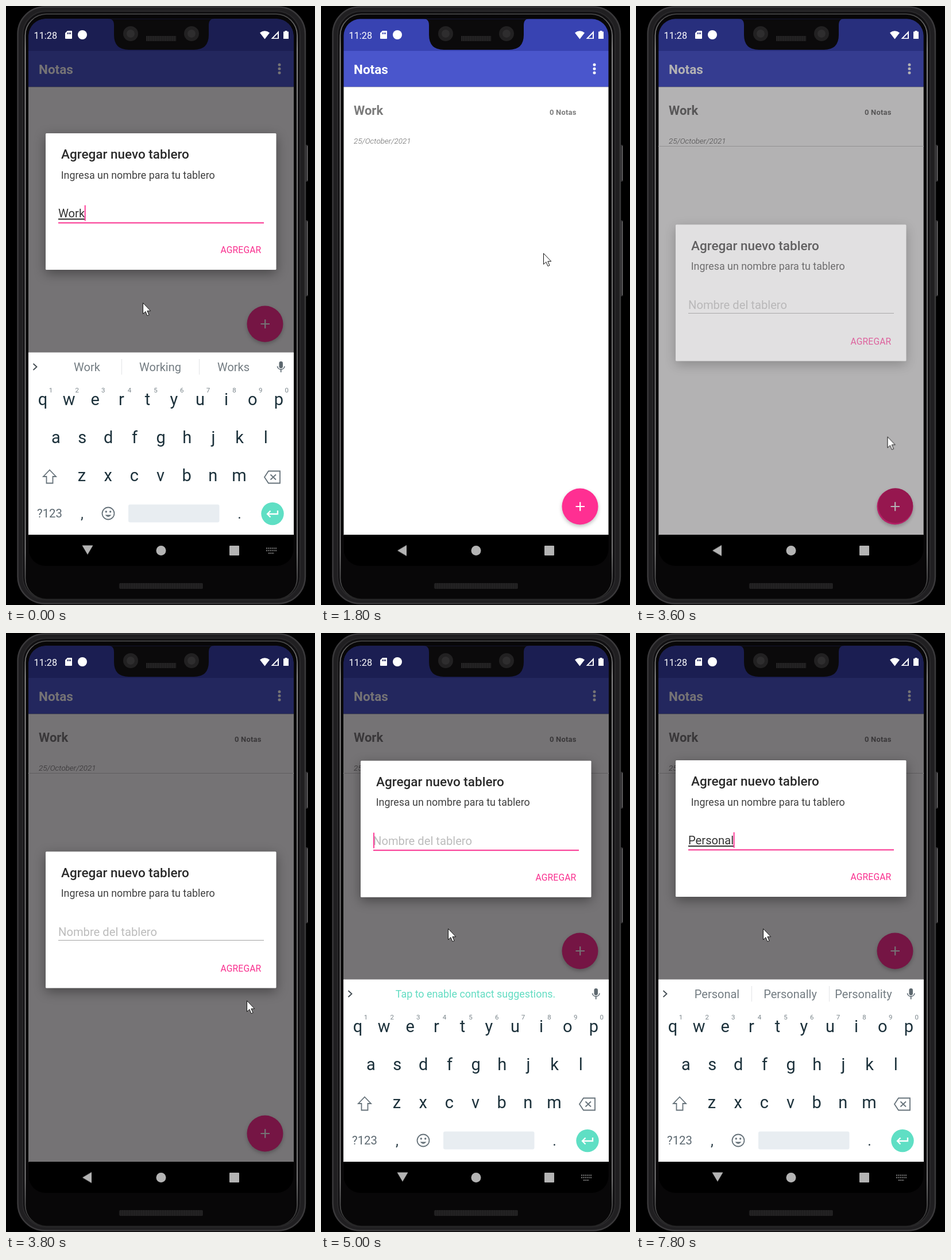
Animation of 538 by 1040 pixels, one loop 8 s. Source, as an HTML page:

```html
<!DOCTYPE html>
<html lang="es">
<head>
<meta charset="utf-8">
<title>Notas</title>
<style>
html, body { margin: 0; width: 100%; height: 100%; overflow: hidden; background: #000; }
svg { display: block; width: 100%; height: 100%; font-family: Roboto, sans-serif; }
.medium { font-weight: 500; }
.bold { font-weight: 700; }
.mid { text-anchor: middle; }
.line { fill: none; stroke: #66727a; stroke-width: 1.8; }

#pointer, #dim, #dialog, #card, #keys, #fab, #press, #board, #divider, #back, #imeIcon {
  animation: 8s step-end infinite;
}
#pointer { animation-name: pointer; }
#dim { animation-name: dim; }
#dialog { animation-name: dialog; }
#card { animation-name: card; filter: drop-shadow(0 6px 10px rgba(0,0,0,.38)); }
#keys { animation-name: keys; }
#fab { animation-name: fab; }
#press { animation-name: press; }
#board { animation-name: board; }
#divider { animation-name: divider; }
#back { animation-name: back; }
#imeIcon { animation-name: ime; }
#disc { filter: drop-shadow(0 3px 3px rgba(0,0,0,.25)); }
#typed { text-decoration: underline 1px; }

@keyframes pointer {
  0% { transform: translate(238px,515px); }
  7.5% { transform: translate(238px,515px); animation-timing-function: steps(3); }
  15% { transform: translate(387px,429px); }
  30% { transform: translate(387px,429px); animation-timing-function: steps(4); }
  40% { transform: translate(456px,857px); }
  42.5% { transform: translate(456px,857px); animation-timing-function: steps(2); }
  47.5% { transform: translate(419px,638px); animation-timing-function: steps(3); }
  55%, 100% { transform: translate(221px,513px); }
}
@keyframes dim {
  0% { opacity: .55; } 20% { opacity: .25; } 22.5% { opacity: 0; }
  45% { opacity: .3; } 47.5%, 100% { opacity: .55; }
}
@keyframes dialog {
  0% { opacity: 1; } 20% { opacity: .35; } 22.5% { opacity: 0; }
  45% { opacity: .6; } 47.5%, 100% { opacity: 1; }
}
@keyframes card {
  0% { transform: none; } 22.5% { transform: translateY(158.5px); }
  60% { transform: translateY(55px); } 62.5% { transform: translateY(.7px); }
  65%, 100% { transform: none; }
}
@keyframes keys {
  0% { transform: none; } 20% { transform: translateY(170px); }
  22.5% { transform: translateY(320px); } 60% { transform: translateY(90px); }
  62.5%, 100% { transform: none; }
}
@keyframes fab {
  0% { transform: translate(451px,552px); } 20% { transform: translate(451px,869px); }
  60%, 100% { transform: translate(451px,552px); }
}
@keyframes press { 0% { opacity: 0; } 42.5% { opacity: 1; } 47.5%, 100% { opacity: 0; } }
@keyframes board { 0% { opacity: 0; } 20%, 100% { opacity: 1; } }
@keyframes divider { 0% { opacity: 0; } 45%, 100% { opacity: 1; } }
@keyframes back {
  0% { transform: translateY(-2px) rotate(-90deg); } 20% { transform: rotate(-45deg); }
  22.5% { transform: none; } 60% { transform: rotate(-45deg); }
  62.5%, 100% { transform: translateY(-2px) rotate(-90deg); }
}
@keyframes ime { 0% { opacity: 1; } 20% { opacity: 0; } 60% { opacity: .5; } 62.5%, 100% { opacity: 1; } }
</style>
</head>
<body>
<svg viewBox="0 0 538 1040">
  <defs>
    <clipPath id="screen"><rect x="39.500" y="22.500" width="461" height="949.500" rx="29"/></clipPath>
    <clipPath id="keyArea"><rect x="39" y="590" width="462" height="328"/></clipPath>
    <linearGradient id="edge" x1="0" y1="0" x2="0" y2="1">
      <stop offset="0" stop-color="#4a4a4a"/><stop offset=".06" stop-color="#a5a5a5"/>
      <stop offset=".5" stop-color="#858585"/><stop offset=".92" stop-color="#8f8f8f"/>
      <stop offset="1" stop-color="#222"/>
    </linearGradient>
    <pattern id="mesh" width="3" height="3" patternUnits="userSpaceOnUse">
      <rect width="3" height="3" fill="#262526"/><rect width="1" height="3" fill="#171617"/>
    </pattern>
  </defs>

  <!-- phone body -->
  <rect width="538" height="1040"/>
  <g fill="#2c2b2d">
    <rect x="520" y="241" width="6" height="64" rx="2"/>
    <rect x="520" y="372" width="6" height="132" rx="2"/>
    <path d="M524.500 243V303M524.500 374V502" stroke="#777"/>
  </g>
  <rect x="20.500" y="1.500" width="500.500" height="1036" rx="47" fill="#201f21" stroke="#3a393b" stroke-width="2.500"/>
  <rect x="29" y="9" width="483" height="1022" rx="41" fill="#111012" stroke="#29282a" stroke-width="2"/>
  <rect x="33.500" y="14" width="473.500" height="1016" rx="37" fill="#080708" stroke="url(#edge)" stroke-width="1.600"/>
  <rect x="197" y="1002" width="146" height="10" rx="2" fill="url(#mesh)"/>

  <g clip-path="url(#screen)">
    <!-- app -->
    <rect x="39" y="22" width="462" height="56" fill="#3843b2"/>
    <rect x="39" y="78" width="462" height="62.500" fill="#4a56cc"/>
    <rect x="39" y="140.500" width="462" height="778" fill="#fff"/>
    <text x="57" y="118" font-size="22.500" class="bold" fill="#fff">Notas</text>
    <g fill="#fff"><circle cx="476" cy="102" r="2.500"/><circle cx="476" cy="109" r="2.500"/><circle cx="476" cy="116" r="2.500"/></g>
    <g id="board" fill="#7b7b7b">
      <text x="57" y="189" font-size="22" class="bold">Work</text>
      <text x="398" y="189" font-size="13" class="bold" letter-spacing=".2">0 Notas</text>
      <text x="57" y="239" font-size="13.500" font-style="italic" font-weight="300" fill="#666">25/October/2021</text>
      <path id="divider" d="M39 243.500H501" stroke="#cfcfcf"/>
    </g>
    <g id="fab">
      <circle id="disc" r="31.500" fill="#ff2f92"/>
      <circle id="press" cx=".8" cy="-1.500" r="30.300" fill="#d5216f"/>
      <path d="M-7.500 0H8M.2 -7.700V7.700" stroke="#fff" stroke-width="2.200"/>
    </g>
    <rect id="dim" x="39" y="22" width="462" height="896" fill="#040004"/>

    <!-- status bar -->
    <g fill="#fff">
      <text x="48.500" y="56.500" font-size="16.300">11:28</text>
      <path d="M107 43H114Q115 43 115 44V56Q115 57 114 57H104Q103 57 103 56V47ZM106.500 46V49H108V46ZM109 46V49H110.500V46ZM111.500 46V49H113V46Z" fill-rule="evenodd"/>
      <circle cx="133" cy="50" r="8"/>
      <path d="M442 46.500Q450.500 40 459 46.500L450.500 57.500Z"/>
      <path d="M475 43V57H461.500ZM473 48L465.500 55.500H473Z" fill-rule="evenodd"/>
      <path d="M485.500 43H489.500V44.500H492V57H483V44.500H485.500Z"/>
    </g>
    <path d="M178 22Q188 22 188 33V50Q188 76 214 76H327Q353 76 353 50V33Q353 22 363 22Z" fill="#0b0a0b"/>
    <g fill="#222122">
      <circle cx="217" cy="48" r="13"/><circle cx="323" cy="48" r="13"/>
      <g fill="#2e2d2e"><circle cx="217" cy="48" r="7"/><circle cx="323" cy="48" r="7"/></g>
    </g>
    <rect x="244" y="52" width="52" height="9" fill="url(#mesh)"/>

    <!-- dialog -->
    <g id="dialog"><g id="card">
      <rect x="69" y="221" width="401.500" height="237" rx="1.500" fill="#fff"/>
      <text x="96" y="265" font-size="22.500" class="medium" fill="#2a2a2a">Agregar nuevo tablero</text>
      <text x="95.700" y="299.500" font-size="17.850" fill="#404040">Ingresa un nombre para tu tablero</text>
      <text id="hint" x="91" y="367" font-size="20.200" fill="#bcbcbc">Nombre del tablero</text>
      <text id="typed" x="91" y="367" font-size="20.200" fill="#333"></text>
      <path id="rule" d="M91 376.500H449"/>
      <rect id="caret" y="346" width="2" height="27" fill="#ff3d98"/>
      <text x="373.500" y="429" font-size="15.700" letter-spacing=".12" fill="#f9308f">AGREGAR</text>
    </g></g>

    <!-- navigation bar -->
    <rect x="39" y="918" width="462" height="54"/>
    <g fill="#b4b4b4">
      <g transform="translate(142 945.500)"><path id="back" d="M-9 0L7 -9.500V9.500Z"/></g>
      <circle cx="270" cy="945.500" r="8.500"/>
      <rect x="389" y="937" width="17" height="17" rx="1"/>
      <path id="imeIcon" d="M453 941.500H471M453 945.500H471M457 950H467" stroke="#808080" stroke-width="1.800" stroke-dasharray="2 1.200"/>
    </g>

    <!-- keyboard -->
    <g clip-path="url(#keyArea)"><g id="keys">
      <rect x="39" y="601.500" width="462" height="317" fill="#fff"/>
      <path d="M47.500 621L53.500 626.500L47.500 632" class="line" style="stroke:#404a50"/>
      <g id="words" class="mid" font-size="20" fill="#737c82">
        <text x="141" y="634"></text><text x="268.500" y="634"></text><text x="396" y="634"></text>
        <path d="M201.500 613V640M336.500 613V640" stroke="#e2e5e7"/>
      </g>
      <text id="tip" class="mid" x="269" y="633" font-size="17.900" fill="#62dcc2">Tap to enable contact suggestions.</text>
      <rect x="475.500" y="617" width="6.500" height="12" rx="3.200" fill="#5d686f"/>
      <path d="M472.500 625.500A6.300 6.300 0 0 0 485 625.500M478.700 631.500V636" class="line"/>
      <g id="letters" class="mid" font-size="29" fill="#1c313b"></g>
      <g id="marks" class="mid" font-size="25" fill="#2a3d46"></g>
      <g id="digits" class="mid" font-size="11.500" fill="#7a858b"></g>
      <path d="M76 805.500L87 817H81.500V828.500H70.500V817H65Z" class="line"/>
      <path d="M457 807.500H477V828.500H457L450 818ZM460.500 813.500L470 822.500M470 813.500L460.500 822.500" class="line"/>
      <text x="76" y="888" class="mid" font-size="20.300" fill="#5c6870">?123</text>
      <circle cx="178" cy="881" r="10.500" class="line"/>
      <path d="M172.500 883.500Q178 890.500 183.500 883.500Z" fill="#66727a"/>
      <g fill="#66727a"><circle cx="174.300" cy="878" r="1.700"/><circle cx="181.700" cy="878" r="1.700"/></g>
      <rect x="213" y="865.500" width="158.500" height="31" rx="3" fill="#e8edf1"/>
      <circle cx="464" cy="881.500" r="19.700" fill="#5fdfc4"/>
      <path d="M473 876V882H455.500M460.500 876.500L455 882L460.500 887.500" class="line" style="stroke:#fff;stroke-width:2.300"/>
    </g></g>
  </g>

  <path id="pointer" d="M.5 .5V19.500L4.900 15.400L8 22.700L11 21.400L7.900 14.300H13.700Z" fill="#fff" stroke="#111"/>
</svg>
<script>
const $ = id => document.getElementById(id);
const LOOP = 8000, STEP = 200, NAME = 'Personal', FIRST_KEY = 6400;
const suggestions = {
  Work: 'Work Working Works',
  P: 'P Pm Pa',
  Pe: 'Pe Per Person',
  Per: 'Per Person Personal',
  Pers: 'Pers Person Personal',
  Perso: 'Perso Person Personal',
  Person: 'Person Personal Persons',
  Persona: 'Persona Personal Personally',
  Personal: 'Personal Personally Personality'
};

function row(parent, chars, x, y, gap = 45.65) {
  [...chars].forEach((char, i) => {
    const label = document.createElementNS('http://www.w3.org/2000/svg', 'text');
    label.setAttribute('x', x + i * gap);
    label.setAttribute('y', y);
    label.textContent = char;
    parent.append(label);
  });
}
row($('letters'), 'qwertyuiop', 64, 693);
row($('letters'), 'asdfghjkl', 87, 759);
row($('letters'), 'zxcvbnm', 132, 825);
row($('marks'), ',.', 132.5, 890, 274);
row($('digits'), '1234567890', 78, 671);

const show = (id, on) => $(id).style.display = on ? '' : 'none';
const slots = $('words').querySelectorAll('text');

function draw(t) {
  const early = t < 3000;
  const count = Math.max(0, Math.floor((t - FIRST_KEY) / STEP) + 1);
  const text = early ? 'Work' : NAME.slice(0, count);
  const focused = early || t >= 4600;
  const blinkStart = early ? -100 : count ? t : 4600;

  $('typed').textContent = text;
  show('hint', !text);
  show('tip', !text);
  show('words', text);
  (suggestions[text] || '  ').split(' ').forEach((word, i) => slots[i].textContent = word);

  $('rule').setAttribute('stroke', focused ? '#f9308f' : '#a2a2a2');
  $('rule').setAttribute('stroke-width', focused ? 2 : 1.2);
  $('rule').setAttribute('transform', focused ? '' : 'translate(0 -1.5)');
  show('caret', focused && (t - blinkStart) % 1000 < 500);
  $('caret').setAttribute('x', 91 + (text ? $('typed').getComputedTextLength() - .5 : 0));
}

let start, last = 0;
function tick(now) {
  start ??= now;
  const t = Math.floor((now - start) % LOOP / STEP) * STEP;
  if (t !== last) draw(last = t);
  requestAnimationFrame(tick);
}
draw(0);
requestAnimationFrame(tick);
</script>
</body>
</html>
```
